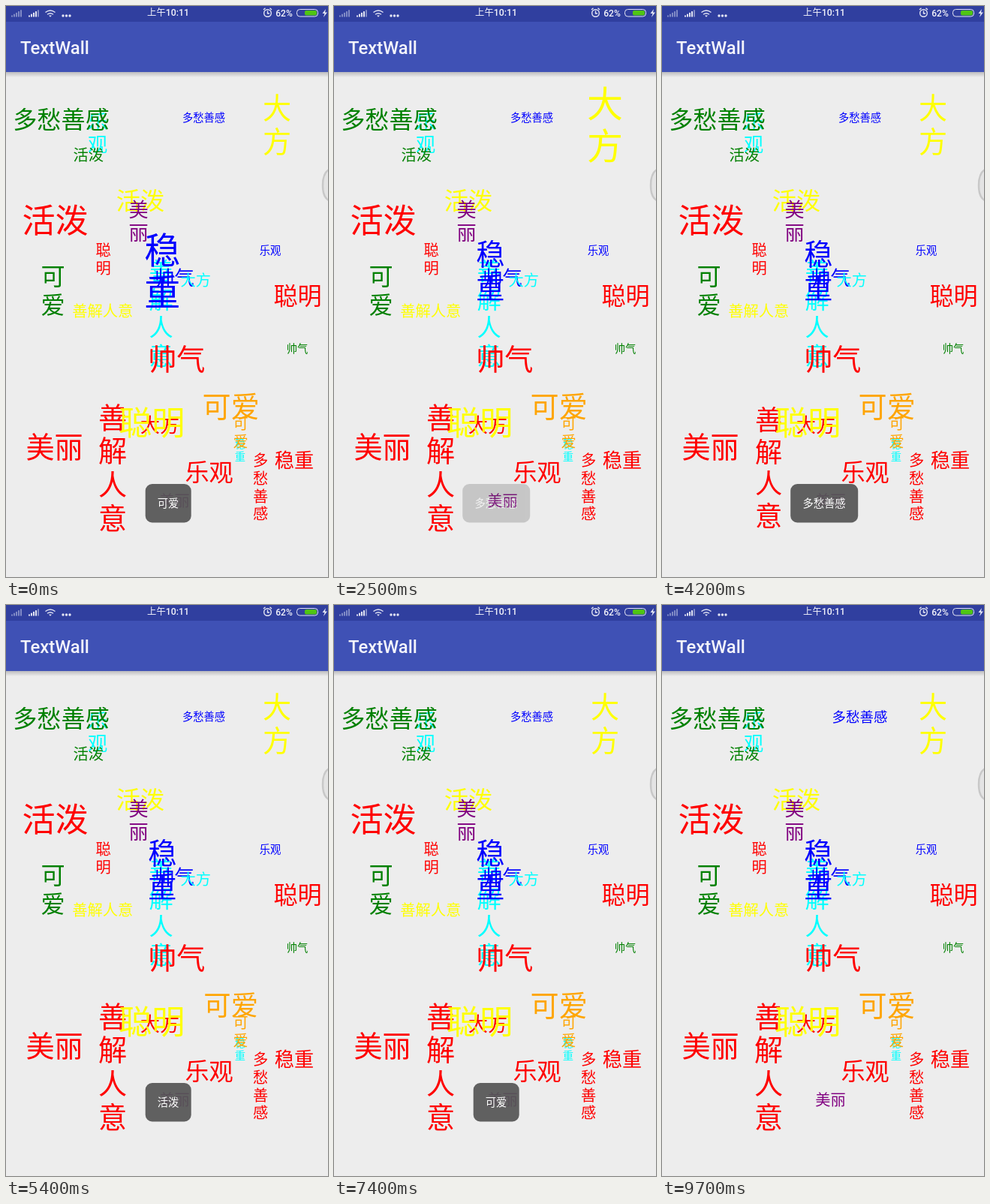
Write an HTML page that moves like this. It is 429x761 px and loops after 9800 ms.

```html
<!DOCTYPE html>
<html lang="zh-CN">
<head>
<meta charset="utf-8">
<style>
html, body { margin: 0; width: 100%; height: 100%; overflow: hidden; background: #ededed; }
svg { display: block; }
text { font-family: 'Noto Sans CJK SC', 'Noto Sans CJK', sans-serif; text-anchor: middle; }
.ui { font-family: Roboto, 'Noto Sans CJK SC', sans-serif; font-weight: 500; fill: #f4f4fb; }
</style>
</head>
<body>
<svg width="429" height="761" viewBox="0 0 429 761">
  <defs>
    <linearGradient id="shadow" x2="0" y2="1">
      <stop stop-color="#bcbcbe"/><stop offset="1" stop-color="#ededed"/>
    </linearGradient>
  </defs>
  <rect width="429" height="761" fill="#ededed"/>
  <rect y="88" width="429" height="7" fill="url(#shadow)"/>
  <rect width="429" height="88" fill="#3f51b5"/>
  <rect width="429" height="21" fill="#303f9f"/>
  <text class="ui" x="65" y="64" font-size="23.83">TextWall</text>
  <text class="ui" x="216" y="13.2" font-size="12.3">上午10:11</text>
  <text class="ui" x="370.5" y="13.5" font-size="12">62%</text>
  <g id="status" fill="#e4e6f4">
    <circle cx="76" cy="13" r="1.7"/><circle cx="80.5" cy="13" r="1.7"/><circle cx="85" cy="13" r="1.7"/>
    <g fill="none" stroke="#e4e6f4" stroke-width="1.4">
      <path d="M52.5 8.5q6.5-5 13 0M55 11.2q4-3 8 0"/>
      <circle cx="348.5" cy="9.5" r="4.8"/>
      <path d="M348.5 6.5v3.5h2.5M343 5l2.5-2.2M354 5l-2.5-2.2"/>
      <rect x="387.5" y="4.5" width="28" height="9.5" rx="4" stroke-width="1"/>
    </g>
    <path d="M57 12.5h4l-2 2.2zM426 4l-4.5 6h3l-1.5 5 5-6.5h-3z"/>
    <rect x="398" y="6" width="16" height="6.5" rx="2" fill="#4fc414"/>
  </g>
  <g id="wall"></g>
  <path d="M430 218q-8 5-8 21t8 20" fill="#e4e4e4" stroke="#c8c8c8" stroke-width="2.5"/>
  <g id="toast">
    <rect y="637" height="51.5" rx="9" fill="#565656" fill-opacity=".93"/>
    <text x="216" y="667.8" font-size="14.3" fill="#fff"></text>
  </g>
</svg>
<script>
const LOOP = 9800, PULSE = 1000;
const DP = 429 / 360, LINE_HEIGHT = 1.172;
const H = false, V = true;

// text, direction, centre x, centre y, size in dp, colour, tap time
const words = [
  ['乐观', V, 122, 169.5, 22, 'cyan'],
  ['多愁善感', H, 73.5, 151.5, 27, 'green'],
  ['活泼', H, 109.7, 199, 17, 'green'],
  ['多愁善感', H, 263.5, 149, 12, 'blue', 8760],
  ['大方', V, 361, 158.5, 32, 'yellow', 1580],
  ['活泼', H, 179, 259, 27, 'yellow'],
  ['美丽', V, 176.5, 287, 22, 'purple'],
  ['活泼', H, 65.5, 286, 37, 'red', 6150],
  ['聪明', V, 129.7, 337.5, 17, 'red'],
  ['乐观', H, 352, 325.5, 12, 'blue'],
  ['善解人意', V, 206.7, 410, 27, 'cyan'],
  ['帅气', H, 224.5, 363, 22, 'blue'],
  ['大方', H, 252.7, 366, 17, 'cyan'],
  ['稳重', V, 208.2, 354, 32, 'blue', -920],
  ['可爱', V, 62.7, 379.5, 27, 'green'],
  ['善解人意', H, 128.7, 407, 17, 'yellow'],
  ['聪明', H, 388.6, 386, 27, 'red'],
  ['帅气', H, 388, 457, 12, 'green'],
  ['帅气', H, 227.3, 471.5, 32, 'red'],
  ['善解人意', V, 142, 616, 32, 'red', 3820],
  ['大方', H, 205, 558.5, 22, 'red'],
  ['聪明', H, 194.3, 556, 37, 'yellow', 7350],
  ['可爱', H, 299.7, 534, 32, 'orange', 5050],
  ['稳重', V, 312, 592, 12, 'cyan'],
  ['可爱', V, 312.5, 568.5, 17, 'orange'],
  ['美丽', H, 64.6, 588, 32, 'red', 2680],
  ['乐观', H, 270.6, 621, 27, 'red'],
  ['多愁善感', V, 339, 641.5, 17, 'red'],
  ['稳重', H, 384, 605.5, 22, 'red'],
  ['美丽', H, 224.5, 659.6, 17, 'purple']
];

// text, width, start of fade in, end of fade out
const toasts = [
  ['可爱', 61, -400, 2300],
  ['多愁善感', 90, 2420, 4650],
  ['活泼', 61, 4700, 6810],
  ['可爱', 61, 6900, 9150]
];

const svgNS = 'http://www.w3.org/2000/svg';
const wall = document.getElementById('wall');
const toast = document.getElementById('toast');
const [toastBox, toastText] = toast.children;

function add(parent, tag, attrs) {
  const el = parent.appendChild(document.createElementNS(svgNS, tag));
  for (const key in attrs) el.setAttribute(key, attrs[key]);
  return el;
}

// Signal strength bars
[[7, .45], [30, 1]].forEach(([x, opacity]) => {
  for (let i = 0; i < 5; i++) {
    const height = 2 + i * 1.8;
    add(document.getElementById('status'), 'rect',
      { x: x + i * 3, y: 14.5 - height, width: 2, height, opacity: i > 3 ? .45 : opacity });
  }
});

const tapped = [];
for (const [text, vertical, x, y, dp, fill, start] of words) {
  const size = dp * DP;
  const group = add(wall, 'g', { 'font-size': size, fill, transform: `translate(${x} ${y})` });
  const lines = vertical ? [...text] : [text];
  lines.forEach((line, i) => {
    const row = i - (lines.length - 1) / 2;
    add(group, 'text', { y: size * (row * LINE_HEIGHT + .36) }).textContent = line;
  });
  if (start !== undefined) tapped.push({ group, x, y, start });
}

// Dips first, then grows; the word snaps back when the pulse ends
const anticipate = p => p * p * (3 * p - 2);

function draw(now) {
  const t = now % LOOP;
  for (const { group, x, y, start } of tapped) {
    const p = (t - start) / PULSE;
    const scale = p > 0 && p < 1 ? 1 + .4 * anticipate(p) : 1;
    group.setAttribute('transform', `translate(${x} ${y}) scale(${scale})`);
  }
  const current = toasts.find(([, , from, to]) => t >= from && t < to);
  toast.setAttribute('opacity', current ? Math.min(1, (t - current[2]) / 300, (current[3] - t) / 300) : 0);
  if (current) {
    const [text, width] = current;
    toastBox.setAttribute('x', 216.2 - width / 2);
    toastBox.setAttribute('width', width);
    toastText.textContent = text;
  }
}

const origin = performance.now();
function frame() {
  draw(performance.now() - origin);
  requestAnimationFrame(frame);
}
frame();
</script>
</body>
</html>
```
